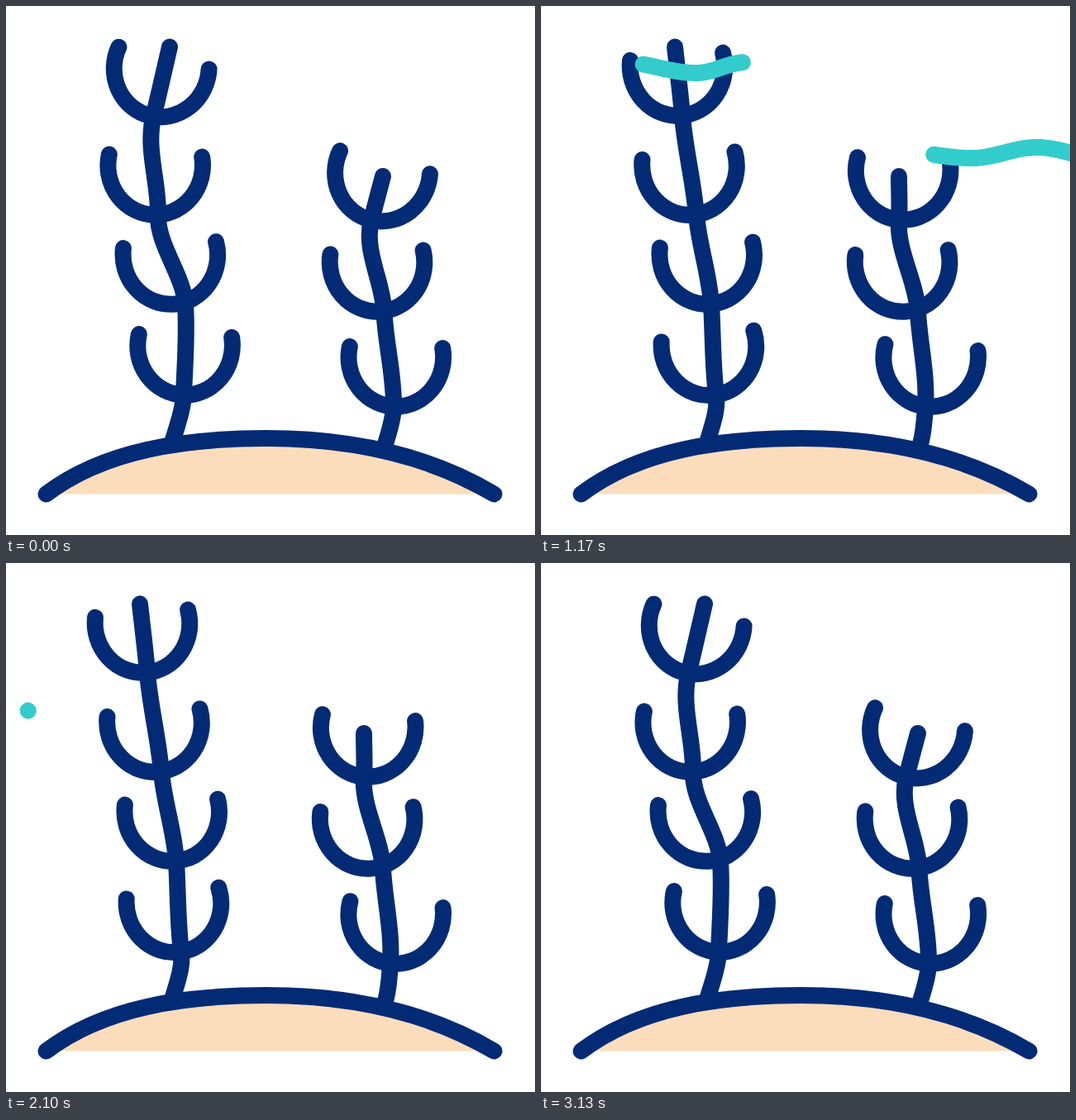
Animation, 640 px wide and 640 px high, one loop 3370 ms. Source, as an HTML page:

```html
<!DOCTYPE html>
<html lang="en">
<head>
<meta charset="utf-8">
<title>Seaweed</title>
<style>
  html, body { margin: 0; width: 100%; height: 100%; overflow: hidden; background: #fff; }
  svg { display: block; width: 100vw; height: 100vh; }
  path { fill: none; stroke: #032b75; stroke-width: 20; stroke-linecap: round; stroke-linejoin: round; }
  .sand { fill: #fbddbb; stroke: none; }
  .wave { stroke: #33cccc; }
</style>
</head>
<body>
<svg viewBox="0 0 640 640">
  <path class="sand" d="M48.5 590.5C119 537 217 523 315 523S507 541 590.5 590.5Z"/>
  <g id="plants"></g>
  <path d="M48.5 590.5C119 537 217 523 315 523S507 541 590.5 590.5"/>
  <g id="waves"></g>
</svg>
<script>
const LOOP = 3370;
const FROND_DEPTH = 72;
const ROOT_LEAN = 16;

// Every triple holds the pose swept right, swept left and at rest.
// stem: x of the stem, frond: x of the frond's middle, turn: its angle in degrees,
// calm: how far the part has settled from left to rest midway.
const plants = [
  {
    root: [202, 525],
    joints: [
      { y: 471, calm: 3.5, stem: [215, 213, 212], frond: [217, 197, 201.5], turn: [2, -8.6, -7] },
      { y: 361, calm: 0.6, stem: [217, 181, 206], frond: [198, 157.5, 200], turn: [-4, -21, -3.5] },
      { y: 253, calm: 0.87, stem: [184, 168, 188], frond: [181, 147, 178.5], turn: [1.5, -11.8, -4.9] },
      { y: 133, calm: 0.67, stem: [178.5, 158, 171], frond: [191, 142.5, 164], turn: [13.8, -9.2, -4.7] }
    ],
    tip: { y: 49.5, calm: 0.67, stem: [198, 144, 162] }
  },
  {
    root: [459, 530],
    joints: [
      { y: 485, calm: 0.21, stem: [469, 467, 465], frond: [472, 427, 472.5], turn: [1, -30.7, 4] },
      { y: 370, calm: 0.45, stem: [457.5, 434, 456], frond: [448.5, 412, 436.5], turn: [-2.5, -14.3, -3] },
      { y: 259, calm: 0.54, stem: [442, 429, 433], frond: [458.5, 401, 439], turn: [14.4, -17, 4] }
    ],
    tip: { y: 206, calm: 0.5, stem: [456, 411, 433] }
  }
];

const mix = (a, b, k) => a + (b - a) * k;
const slant = deg => -Math.tan(deg * Math.PI / 180);

// Cubic from v0 to v1 over a span h, with end slopes m0 and m1.
function hermite(v0, v1, m0, m1, h, u) {
  const w = 1 - u;
  return v0 * w * w * (1 + 2 * u) + v1 * u * u * (3 - 2 * u) + h * u * w * (w * m0 - u * m1);
}

// Smooth curve through [time, value] keys without overshoot.
function curve(keys, t, flatEnds) {
  const last = keys.length - 1;
  if (t >= keys[last][0]) return keys[last][1];
  const slope = i => (keys[i + 1][1] - keys[i][1]) / (keys[i + 1][0] - keys[i][0]);
  const tangent = i => {
    if (i === 0 || i === last) return flatEnds ? 0 : slope(Math.min(i, last - 1));
    const a = slope(i - 1), b = slope(i);
    return a * b > 0 ? 2 * a * b / (a + b) : 0;
  };
  let i = 0;
  while (t > keys[i + 1][0]) i++;
  const [t0, v0] = keys[i], [t1, v1] = keys[i + 1];
  return hermite(v0, v1, tangent(i), tangent(i + 1), t1 - t0, (t - t0) / (t1 - t0));
}

// Sweep left and past it, settle, rest, then lean left again and return.
function sway([right, left, rest], calm, t) {
  return curve([
    [0, right], [330, left], [430, mix(right, left, 1.18)], [530, left],
    [830, mix(left, rest, calm)], [1150, rest], [2110, rest],
    [2470, mix(left, rest, calm + 0.09)], [2690, mix(left, rest, calm * 0.45)],
    [3130, right]
  ], t, true);
}

function addPath(parent, cls, d) {
  const p = document.createElementNS("http://www.w3.org/2000/svg", "path");
  p.setAttribute("class", cls);
  p.setAttribute("d", d);
  document.getElementById(parent).appendChild(p);
  return p;
}

// Stem through [x, y, slope] points, the slope being dx/dy.
function stemPath(pts) {
  let d = `M${pts[0][0]} ${pts[0][1]}`;
  for (let i = 1; i < pts.length; i++) {
    const [x0, y0, m0] = pts[i - 1], [x1, y1, m1] = pts[i], h = (y1 - y0) / 3;
    d += `C${x0 + h * m0} ${y0 + h} ${x1 - h * m1} ${y1 - h} ${x1} ${y1}`;
  }
  return d;
}

// The stem leans with the fronds it carries.
function drawPlant(p, t) {
  const pts = [[...p.root, slant(-(-ROOT_LEAN))]];
  for (const j of p.joints) {
    const turn = sway(j.turn, j.calm, t);
    const x = sway(j.frond, j.calm, t);
    const y = j.y - FROND_DEPTH * Math.cos(turn * Math.PI / 180);
    j.path.setAttribute("transform", `translate(${x} ${y}) rotate(${turn})`);
    pts.push([sway(j.stem, j.calm, t), j.y, slant(turn)]);
  }
  const [x, y] = pts[pts.length - 1];
  const tipX = sway(p.tip.stem, p.tip.calm, t);
  pts.push([tipX, p.tip.y, (tipX - x) / (p.tip.y - y)]);
  p.path.setAttribute("d", stemPath(pts));
}

const WAVE_LIFE = 1210;
const head = [[0, 648], [500, 266], [840, 124], [1200, 8]];
const waves = [{ start: 330, y: 74.5 }, { start: 960, y: 177.5 }];

// The tail runs steadily and catches up with the slowing head.
function wavePath(age, y) {
  const x0 = curve(head, age);
  const x1 = Math.max(x0 + 0.1, 894 - 0.773 * age);
  const trough = x0 + 46 + 18 * Math.cos(2 * Math.PI * age / 840);
  const half = 85 - 0.029 * age;
  const steps = Math.ceil((x1 - x0) / 5);
  let d = "";
  for (let i = 0; i <= steps; i++) {
    const x = mix(x0, x1, i / steps);
    const len = x < trough ? half * 1.5 : half;
    d += `${i ? "L" : "M"}${x} ${y + 6.5 * Math.cos(Math.PI * (x - trough) / len)}`;
  }
  return d;
}

for (const p of plants) {
  p.path = addPath("plants", "stem", "");
  for (const j of p.joints) j.path = addPath("plants", "frond", "M-56.2 0A57.3 60 0 1 0 56.2 0");
}
for (const w of waves) w.path = addPath("waves", "wave", "");

function draw(t) {
  for (const p of plants) drawPlant(p, t);
  for (const w of waves) {
    const age = t - w.start;
    w.path.setAttribute("d", age >= 0 && age < WAVE_LIFE ? wavePath(age, w.y) : "");
  }
}

const begin = performance.now();
function tick() {
  draw((performance.now() - begin) % LOOP);
  requestAnimationFrame(tick);
}
tick();
</script>
</body>
</html>
```
